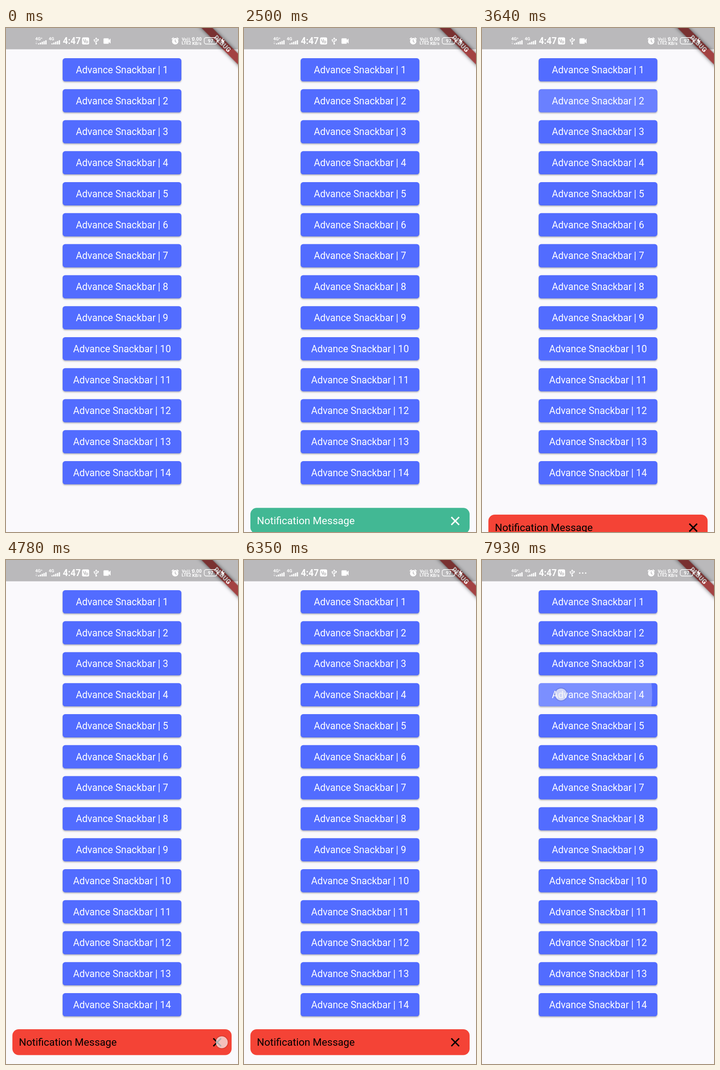
An HTML page for the animation above (8 s loop, 508x1102 px).

```html
<!DOCTYPE html>
<html lang="en">
<head>
<meta charset="utf-8">
<title>Snackbar demo</title>
<style>
  html, body { margin: 0; width: 100%; height: 100%; overflow: hidden; background: #faf9fc; }
  svg { display: block; width: 508px; height: 1102px; font-family: Roboto, sans-serif; }
  .button { fill: #526cff; filter: drop-shadow(0 2px 1.5px rgba(0, 0, 0, .27)); }
  .label { font-size: 21.17px; fill: #fff; text-anchor: middle; }
  .tiny { font-size: 9.5px; font-weight: 700; }
  .line { fill: none; stroke: #fff; }
</style>
</head>
<body>
<svg viewBox="0 0 508 1102">
  <defs><clipPath id="clip"><rect id="clipRect" x="124" width="260" height="50.8" rx="5.6"/></clipPath></defs>
  <g id="buttons"></g>
  <circle id="ripple" fill="#fff" clip-path="url(#clip)"/>
  <g id="labels"></g>

  <g id="snack">
    <rect id="panel" x="14" y="1026" width="480" height="56.5" rx="14"/>
    <text id="message" x="28.3" y="1062" font-size="22.58">Notification Message</text>
    <path id="cross" d="M454 1046l17 17m0-17l-17 17" stroke-width="3" fill="none"/>
  </g>

  <g transform="translate(508 0) rotate(45)">
    <rect x="-90" y="39.5" width="180" height="16.9" style="filter:drop-shadow(0 0 4px rgba(0,0,0,.6))" fill="#a34242"/>
    <text y="53" text-anchor="middle" font-size="14.2" font-weight="900" fill="#fff">DEBUG</text>
  </g>

  <rect width="508" height="46.6" fill="#000" fill-opacity=".26"/>
  <g id="status" fill="#fff">
    <text class="tiny" x="64" y="27">4G⁺</text>
    <text class="tiny" x="93.5" y="27">4G</text>
    <g id="bars"></g>
    <path id="upArrow" d="M64 31.5l2.5-3 2.5 3z"/>
    <path id="downArrow" d="M64 33l2.5 3 2.5-3z"/>
    <text x="124.5" y="35" font-size="19.5" font-weight="700">4:47</text>
    <rect x="166.5" y="20.5" width="15.5" height="15.5" rx="3"/>
    <path d="M170 24v3q0 2 2 2t2-2v-3m-2 5v4" fill="none" stroke="#b9b8ba" stroke-width="1.4"/>
    <circle cx="177" cy="30.5" r="2.2" fill="none" stroke="#b9b8ba" stroke-width="1.3"/>
    <path class="line" d="M197.500 23v11m0-2l-4-3v-3m4 4l4-2.500v-3" stroke-width="1.4"/>
    <path d="M197.500 20.500l2.500 3.500h-5zM200 24h3v3h-3z"/>
    <circle cx="197.500" cy="34.500" r="1.8"/><circle cx="193.500" cy="26" r="1.6"/>
    <path id="camera" d="M215 22.500h8.500q1.500 0 1.500 1.500v2.500l4-3.500v11l-4-3.500v2.500q0 1.500-1.500 1.500H215q-1.500 0-1.500-1.500V24q0-1.500 1.500-1.500z"/>
    <g id="more"><circle cx="214" cy="28.500" r="1.6"/><circle cx="220.500" cy="28.500" r="1.6"/><circle cx="227" cy="28.500" r="1.6"/></g>
    <circle cx="370.500" cy="29" r="7"/>
    <path class="line" d="M363 24.500l4-3.500m7 0l4 3.500" stroke-width="1.8"/>
    <path d="M370.500 25v4.500l3 2" fill="none" stroke="#b9b8ba" stroke-width="1.5"/>
    <text class="tiny" x="385" y="27.500">Vo)) 1</text>
    <text class="tiny" x="384.500" y="36" font-size="9">LTE2</text>
    <text id="speed" x="418" y="28" text-anchor="middle" style="font-size:10.5px;font-weight:700"></text>
    <text class="tiny" x="418" y="36.500" text-anchor="middle">KB/s</text>
    <rect class="line" x="434" y="21" width="28" height="14" rx="4.500" stroke-width="1.4"/>
    <rect x="463.500" y="25.500" width="2" height="5" rx="1"/>
    <text class="tiny" x="448" y="31.800" text-anchor="middle" style="font-size:10.5px">97</text>
    <path d="M475.500 21l-5 8h3.500l-1 7 6-9h-4z"/>
  </g>

  <g id="dot">
    <circle r="15" fill="#000" fill-opacity=".1"/>
    <circle r="12.800" fill="#fff" fill-opacity=".68" stroke="#fff" stroke-opacity=".3"/>
  </g>
</svg>
<script>
const $ = id => document.getElementById(id);
const set = (el, attrs) => { for (const k in attrs) el.setAttribute(k, attrs[k]); return el; };
const add = (parent, tag, attrs) =>
  parent.appendChild(set(document.createElementNS('http://www.w3.org/2000/svg', tag), attrs));
const clamp = v => Math.max(0, Math.min(1, v));
const show = (el, on) => { el.style.display = on ? '' : 'none'; };
const rowY = i => 66 + 67.77 * i;

for (let i = 0; i < 14; i++) {
  add($('buttons'), 'rect', { class: 'button', x: 124, y: rowY(i), width: 260, height: 50.8, rx: 5.6 });
  add($('labels'), 'text', { class: 'label', x: 254, y: rowY(i) + 32.8 }).textContent = `Advance Snackbar | ${i + 1}`;
}
for (const x of [70, 99.5])
  for (let i = 0; i < 5; i++)
    add($('bars'), 'rect', { x: x + 4 * i, y: 33.5 - 1.7 * i, width: 2.8, height: 2.5 + 1.7 * i, rx: .8 });

// Touches: visible from..to, position, optional vertical drag speed
const touches = [
  { from: 490, to: 900, x: 219, y: 82.5 },
  { from: 3350, to: 3600, x: 225, y: 160 },
  { from: 4770, to: 4900, x: 472.5, y: 1054.5 },
  { from: 5490, to: 5600, x: 240, y: 227 },
  { from: 6630, to: 6990, x: 250, y: 1050, drag: .1 },
  { from: 7780, to: 8000, x: 173, y: 294 }
];
const ripples = [
  { start: 643, row: 0, touch: 0 },
  { start: 3357, row: 1, touch: 1 },
  { start: 5500, row: 2, touch: 3 },
  { start: 7786, row: 3, touch: 5 }
];
const snacks = [
  { start: 720, end: 2430, fill: '#42b894', ink: '#fff' },
  { start: 3560, end: 4790, fill: '#f44336', ink: '#000' },
  { start: 5720, end: 6862, fill: '#f44336', ink: '#000' }
];

function draw(t) {
  const touch = touches.find(p => t >= p.from && t < p.to);
  show($('dot'), touch);
  if (touch) set($('dot'), { transform: `translate(${touch.x} ${touch.y + (touch.drag || 0) * (t - touch.from)})` });

  const ripple = ripples.find(r => t > r.start && t < r.start + 420);
  show($('ripple'), ripple);
  if (ripple) {
    const age = t - ripple.start, { x, y } = touches[ripple.touch];
    set($('clipRect'), { y: rowY(ripple.row) });
    set($('ripple'), { cx: x, cy: y, r: 1.4 * age, 'fill-opacity': .24 * clamp((410 - age) / 220) });
  }

  const snack = snacks.find(s => t > s.start && t < s.end + 300);
  show($('snack'), snack);
  if (snack) {
    const rise = (1 - clamp((t - snack.start) / 300)) ** 3;
    const fall = clamp((t - snack.end) / 300);
    set($('snack'), { transform: `translate(0 ${100 * (rise + fall)})` });
    set($('panel'), { fill: snack.fill });
    set($('message'), { fill: snack.ink });
    set($('cross'), { stroke: snack.ink });
  }

  const late = t > 6490;
  show($('camera'), !late);
  show($('more'), late);
  $('speed').textContent = late ? '0.30' : '0.00';
  set($('upArrow'), { opacity: late && t < 7350 ? 1 : .25 });
  set($('downArrow'), { opacity: late && t < 7350 ? 1 : .5 });
}

function tick() {
  const t = performance.now() % 8000;
  const step = Math.floor((t - 63.4) * .007);
  draw(Math.max(0, (step + .5) / .007));
  requestAnimationFrame(tick);
}
tick();
</script>
</body>
</html>
```
